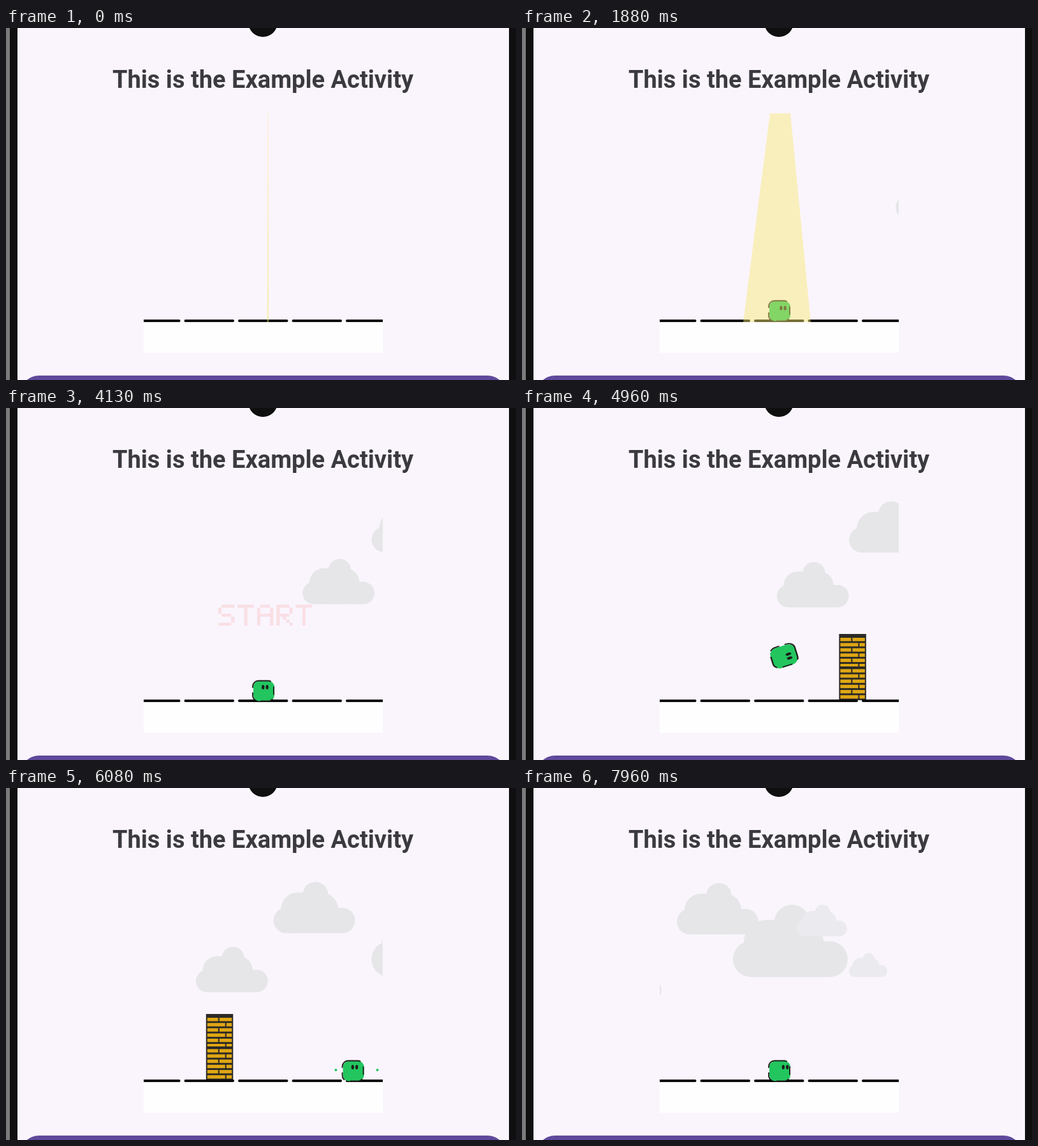
Animation of 800 by 553 pixels, one loop 8 s. Source, as an HTML page with a canvas:

```html
<!DOCTYPE html>
<html lang="en">
<head>
<meta charset="utf-8">
<title>Example Activity</title>
<style>
  html, body { margin: 0; width: 100%; height: 100%; overflow: hidden; background: #faf5fd; }
  canvas { display: block; }
</style>
</head>
<body>
<canvas id="stage" width="800" height="553"></canvas>
<script>
const ctx = document.getElementById('stage').getContext('2d');
const LOOP = 8000;
const SCENE = { left: 216, right: 591, top: 134, bottom: 510 };
const GROUND = 460;
const HOME = 403, REST_Y = 444, LANDING_X = 550;
const JUMP_START = 4830, JUMP_END = 5850;
const GREEN = '#22c55e', DARK = '#1c1c1a', CLOUD = '#e6e6e8', PALE_CLOUD = '#ebeaee';

// All clouds ride one slow sine drift; `end` is the left edge as the loop closes.
const CLOUDS = [
  { w: 113, drift: 525, end: 106, base: 335, sink: 39, color: CLOUD },
  { w: 128, drift: 483, end: 243, base: 230, sink: 5, color: CLOUD },
  { w: 180, drift: 663, end: 331, base: 297, sink: 0, color: CLOUD },
  { w: 79, drift: 663, end: 431, base: 233, sink: 0, color: PALE_CLOUD },
  { w: 60, drift: 525, end: 513, base: 297, sink: 0, color: PALE_CLOUD }
];

// Strokes on a grid of five by seven cells.
const LETTERS = {
  S: 'M1 0H4M0 1V2M1 3H3M4 4V5M0 6H3',
  T: 'M0 0H4M2 0V6',
  A: 'M1 0H3M0 1V6M4 1V6M0 3H4',
  R: 'M0 0V6M0 0H3M4 1V2M0 3H3M2 4H2.01M3 5H3.01M4 6H4.01'
};

const clamp = v => Math.max(0, Math.min(1, v));
const progress = (t, from, to) => clamp((t - from) / (to - from));
const lerp = (a, b, p) => a + (b - a) * p;
const easeInOut = p => (1 - Math.cos(Math.PI * p)) / 2;
const ease = (t, from, to) => easeInOut(progress(t, from, to));

function fillRect(color, x, y, w, h) {
  ctx.fillStyle = color;
  ctx.fillRect(x, y, w, h);
}

function fillRound(color, x, y, w, h, radius) {
  ctx.fillStyle = color;
  ctx.beginPath();
  ctx.roundRect(x, y, w, h, radius);
  ctx.fill();
}

function fillEllipse(color, x, y, rx, ry = rx) {
  ctx.fillStyle = color;
  ctx.beginPath();
  ctx.ellipse(x, y, rx, ry, 0, 0, 2 * Math.PI);
  ctx.fill();
}

function drawScreen() {
  fillRect('#faf5fd', 0, 0, 800, 553);
  fillRect('#7c7b7c', 0, 0, 6, 553);
  fillRect('#0f0f0f', 6, 0, 12, 553);
  fillRect('#0f0f0f', 789, 0, 11, 553);
  fillEllipse('#0f0f0f', 403, -9, 23);
  fillRound('#5f4a9b', 22, 546, 763, 70, 30);
  ctx.fillStyle = '#3b3a3f';
  ctx.font = 'bold 38px Roboto, sans-serif';
  ctx.textAlign = 'center';
  ctx.fillText('This is the Example Activity', 403, 94);
}

function drawCloud(t, { w, drift, end, base, sink, color }) {
  const phase = time => Math.cos((time - 320) * Math.PI / 15650);
  const x = end + drift * (phase(t) - phase(7960));
  const y = base - sink * (phase(t) - phase(7960));
  fillRound(color, x, y - 0.312 * w, w, 0.312 * w, 0.156 * w);
  fillRound(color, x + 0.094 * w, y - 0.5 * w, 0.696 * w, 0.48 * w, 0.2 * w);
  fillEllipse(color, x + 0.515 * w, y - 0.475 * w, 0.156 * w);
}

function drawWall(t) {
  const elapsed = t - 4960;
  const x = 497.5 - 0.1713 * elapsed + 6.6e-6 * elapsed ** 2;
  if (x > SCENE.right) return;
  const width = 42.5, top = 355, rowHeight = 8.2;
  fillRect('#2b2a26', x, top, width, GROUND - 1 - top);
  for (let row = 0; row < 12; row++) {
    const y = top + 6 + row * rowHeight;
    const split = 9 + (row * 11 + 10) % 22;
    const height = row === 5 ? 4 : 5.3;
    fillRect('#e0a714', x + 2, y, split - 2, height);
    fillRect('#e0a714', x + split + 2, y, width - split - 4, height);
  }
}

function drawGround() {
  fillRect('#fefefe', SCENE.left, 462, SCENE.right - SCENE.left, SCENE.bottom - 462);
  for (let i = 0; i < 5; i++) {
    fillRound('#0b0b0b', 195 + i * 84.5, GROUND - 2, 78.5, 4, 2);
  }
}

function drawPlayer({ x, y, angle, stretch, eyeX, eyeY, alpha }) {
  ctx.save();
  ctx.globalAlpha = alpha;
  ctx.translate(x, y);
  ctx.rotate(angle);
  ctx.scale(1, stretch);
  fillRound(GREEN, -15, -15, 33, 31.5, 9);
  ctx.strokeStyle = DARK;
  ctx.lineWidth = 1.8;
  ctx.setLineDash([20, 9, 13, 7]);
  ctx.beginPath();
  ctx.roundRect(-16, -15.5, 33, 32, 9);
  ctx.stroke();
  for (const side of [-3.2, 3.2]) fillEllipse(DARK, eyeX + side, eyeY, 2.1, 3.5);
  ctx.restore();
}

function playerPose(t) {
  const pose = { x: HOME, y: REST_Y, angle: 0, stretch: 1, alpha: 1 };
  const glance = ease(t, 2400, 2600);
  const lookBack = ease(t, 3600, 3800);
  pose.eyeX = lerp(lerp(6.5, -5.5, glance), 3.4, lookBack) + 6.6 * progress(t, 6080, 7960) ** 1.6;
  pose.eyeY = lerp(-4, -5.5, lookBack);

  if (t < JUMP_START) {
    pose.alpha = progress(t, 700, 950);
    pose.y = lerp(SCENE.top + 17, REST_Y, ease(t, 700, 1500));
  } else if (t < JUMP_END) {
    const u = progress(t, JUMP_START, JUMP_END);
    pose.x = lerp(HOME, LANDING_X, u ** 1.4);
    pose.y = REST_Y - 124 * 4 * u * (1 - u);
    pose.angle = 2 * Math.PI * (1 - (1 - u) ** 1.64);
    pose.stretch = 1 + 0.35 * Math.abs(1 - 2 * u) * clamp(Math.min(u, 1 - u) / 0.12);
  } else {
    pose.x = lerp(LANDING_X, HOME, ease(t, 5900, 7250));
  }
  return pose;
}

function drawDust(t) {
  const p = progress(t, JUMP_END, 6200);
  if (p <= 0 || p >= 1) return;
  const out = 1 - (1 - p) ** 2;
  for (const side of [-1, 1]) {
    fillEllipse(GREEN, LANDING_X + side * lerp(14, 35, out), lerp(458, 441, out), 6 * (1 - p));
  }
}

function drawBeam(t) {
  const open = lerp(0.025, 1, ease(t, 0, 600)) * (1 - ease(t, 2050, 2550));
  const corners = [[389, SCENE.top], [421, SCENE.top], [453, 462], [347, 462]];
  ctx.fillStyle = 'rgba(246, 230, 112, 0.46)';
  ctx.beginPath();
  for (const [x, y] of corners) ctx.lineTo(lerp(411, x, open), y);
  ctx.fill();
}

function drawStart(t) {
  const alpha = progress(t, 2950, 3450) - progress(t, 3700, 4200);
  if (alpha <= 0) return;
  ctx.save();
  ctx.globalAlpha = alpha;
  ctx.translate(333, 309);
  ctx.scale(5.07, 4.71);
  ctx.translate(0.5, 0.5);
  const word = new Path2D();
  [...'START'].forEach((letter, i) => word.addPath(new Path2D(LETTERS[letter]), { e: i * 6 }));
  ctx.strokeStyle = '#ef4f50';
  ctx.lineCap = 'square';
  ctx.lineWidth = 1;
  ctx.stroke(word);
  ctx.restore();
}

function drawScene(t) {
  ctx.save();
  ctx.beginPath();
  ctx.rect(SCENE.left, SCENE.top, SCENE.right - SCENE.left, SCENE.bottom - SCENE.top);
  ctx.clip();
  for (const cloud of CLOUDS) drawCloud(t, cloud);
  drawWall(t);
  drawGround();
  drawDust(t);
  drawPlayer(playerPose(t));
  drawBeam(t);
  drawStart(t);
  ctx.restore();
}

const startTime = performance.now();
function render() {
  const t = (performance.now() - startTime) % LOOP;
  drawScreen();
  drawScene(t);
  requestAnimationFrame(render);
}
render();
</script>
</body>
</html>
```
